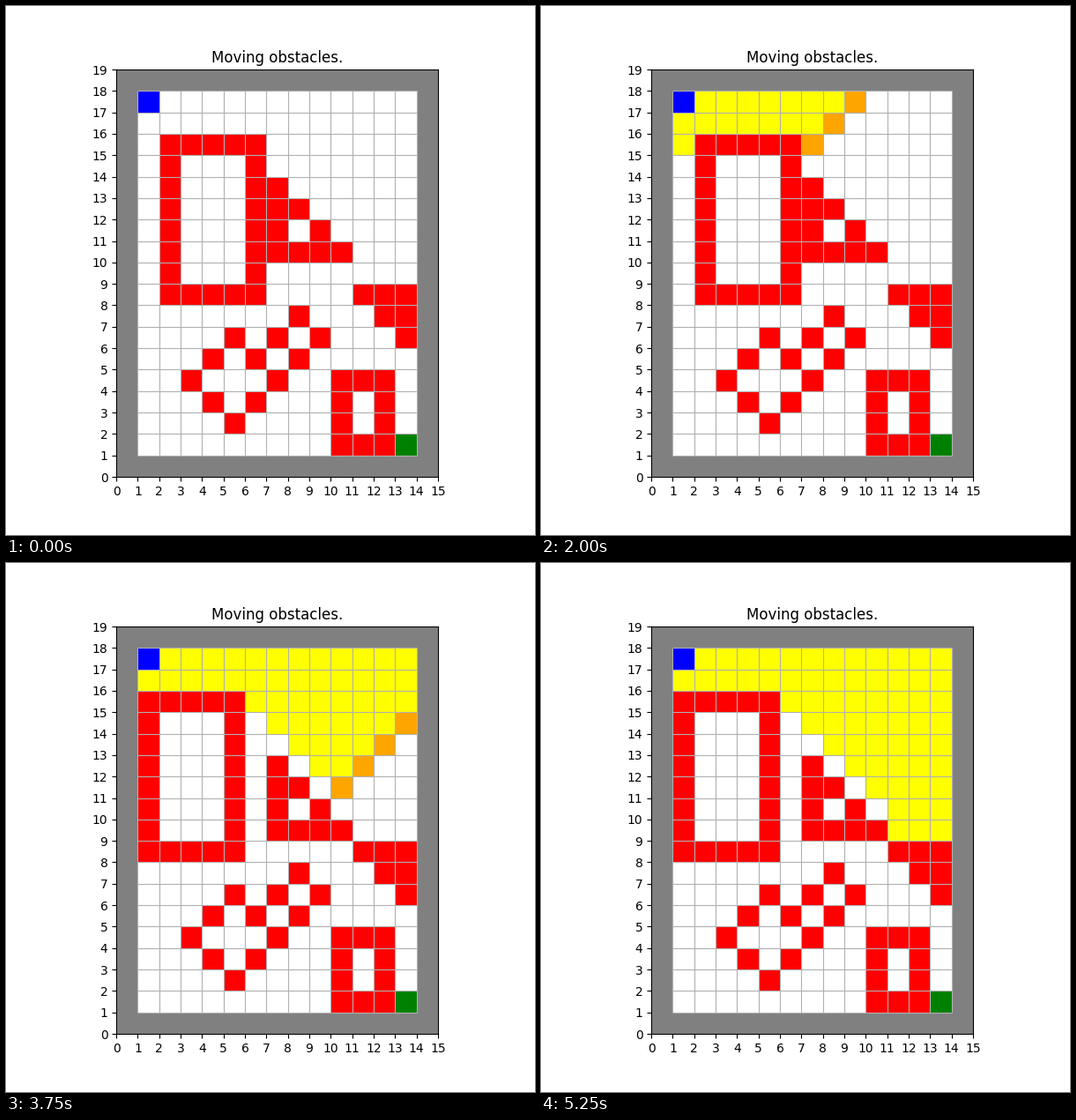
These frames come from a looping animation (600 by 600 pixels, 5.5 s). A matplotlib script:

```python
import matplotlib.pyplot as plt
import numpy as np
from matplotlib.animation import FuncAnimation
from matplotlib.colors import ListedColormap

WIDTH, HEIGHT = 15, 19
STEPS, STEP_MS = 22, 250
START, GOAL = (1, 17), (13, 1)
FREE, WALL, OBSTACLE, VISITED, FRONTIER, BEGIN, END = range(7)
COLORS = ["white", "gray", "red", "yellow", "orange", "blue", "green"]


def box(x0, y0, x1, y1):
    """Cells on the outline of a rectangle, corners included."""
    return {(x, y) for x in range(x0, x1 + 1) for y in range(y0, y1 + 1)
            if x in (x0, x1) or y in (y0, y1)}


def shift(cells, dx, dy):
    return {(x + dx, y + dy) for x, y in cells}


BORDER = box(0, 0, WIDTH - 1, HEIGHT - 1)
DIAMOND = {(8, 7), (5, 6), (7, 6), (9, 6), (4, 5), (6, 5), (8, 5),
           (3, 4), (7, 4), (4, 3), (6, 3), (5, 2)}
CORNER = {(x, y) for y in (6, 7, 8) for x in range(19 - y, 14)}
STATIC = DIAMOND | CORNER | box(10, 1, 12, 4)
ROOM = box(2, 8, 6, 15)
WEDGE = {(7, 13), (7, 12), (8, 12), (7, 11), (9, 11)} | box(7, 10, 10, 10)


def obstacles(step):
    """The room slides left and the wedge down on every odd step."""
    odd = step % 2
    return STATIC | shift(ROOM, -odd, 0) | shift(WEDGE, 0, -odd)


def search(steps):
    """Breadth-first search, one ring per step, among moving obstacles."""
    visited, frontier = set(), {START}
    grids = []
    for step in range(steps):
        blocked = obstacles(step)
        if step:
            visited |= frontier
            neighbours = set()
            for dx, dy in ((1, 0), (-1, 0), (0, 1), (0, -1)):
                neighbours |= shift(frontier - blocked, dx, dy)
            frontier = neighbours - visited - blocked - BORDER
        grid = np.full((HEIGHT, WIDTH), FREE)
        layers = ((visited, VISITED), (frontier, FRONTIER), (blocked, OBSTACLE),
                  (BORDER, WALL), ({START}, BEGIN), ({GOAL}, END))
        for cells, kind in layers:
            for x, y in cells:
                grid[y, x] = kind
        grids.append(grid)
    return grids


grids = search(STEPS)

fig, ax = plt.subplots(figsize=(6, 6), dpi=100)
mesh = ax.pcolormesh(np.arange(WIDTH + 1), np.arange(HEIGHT + 1), grids[0],
                     cmap=ListedColormap(COLORS), vmin=-0.5, vmax=len(COLORS) - 0.5)
line_style = dict(color="#b0b0b0", linewidth=0.8, zorder=1.5)
ax.vlines(range(1, WIDTH), 1, HEIGHT - 1, **line_style)
ax.hlines(range(1, HEIGHT), 1, WIDTH - 1, **line_style)
ax.set(xlim=(0, WIDTH), ylim=(0, HEIGHT), aspect="equal", title="Moving obstacles.",
       xticks=range(WIDTH + 1), yticks=range(HEIGHT + 1))


def draw(step):
    mesh.set_array(grids[step])
    return [mesh]


anim = FuncAnimation(fig, draw, frames=STEPS, interval=STEP_MS, repeat=True)
plt.show()
```
